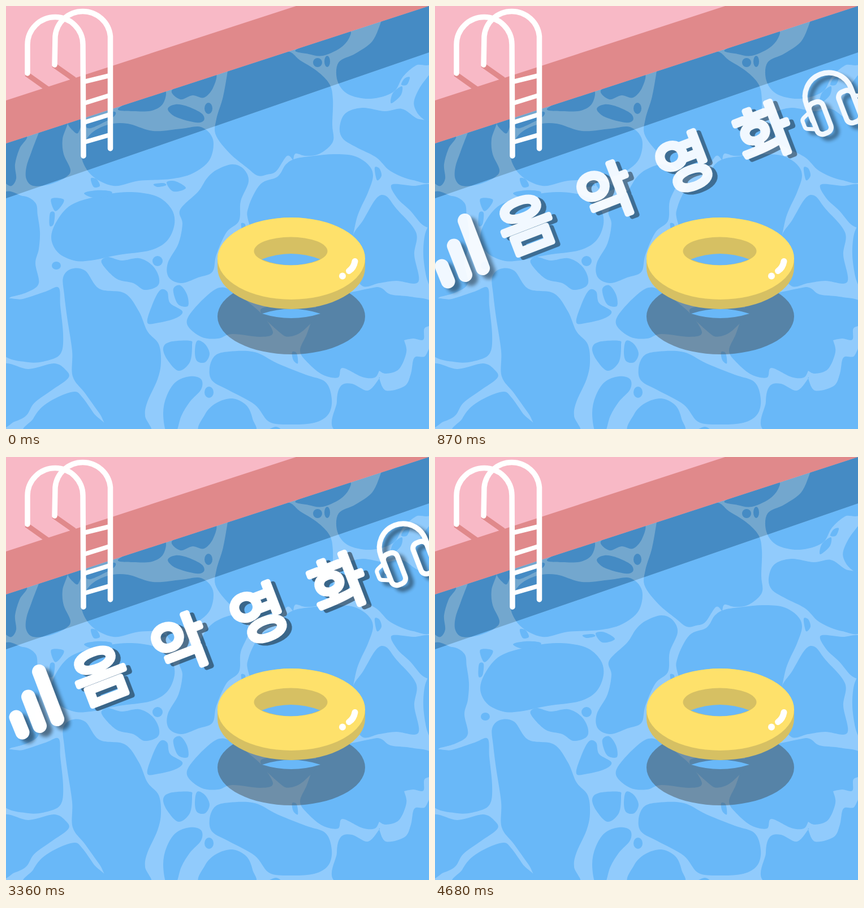
Write an HTML page that moves like this. It is 748 px wide and 748 px high and loops after 4.71 s.

```html
<!DOCTYPE html>
<html lang="ko">
<head>
<meta charset="utf-8">
<title>Pool</title>
<style>
  html, body { margin: 0; width: 100%; height: 100%; overflow: hidden; }
  svg { display: block; width: 100vw; height: 100vh; }
  .line { fill: none; stroke: #fff; stroke-linecap: round; stroke-linejoin: round; }
  .crisp { filter: drop-shadow(9px 4px 0 rgba(0, 0, 0, .45)); }
  .soft { filter: drop-shadow(10px 7px 3px rgba(0, 0, 0, .45)); }
  text {
    font: 400 106px "Noto Sans CJK KR", "Noto Sans CJK JP", "Noto Sans CJK", sans-serif;
    text-anchor: middle; fill: #fff; stroke: #fff; stroke-width: 9; stroke-linejoin: round;
  }
</style>
</head>
<body>
<svg viewBox="0 0 748 748">
  <defs>
    <clipPath id="wall"><path d="M0 243L748 0V82L0 340z"/></clipPath>
    <g id="cells">
      <!-- along the wall -->
      <polygon points="-10 235 36 230 24 252 16 280 18 305 10 318 0 314 -10 300"/>
      <polygon points="58 224 58 224 108 200 100 235 102 262 114 290 104 304 75 316 48 318 36 306 36 285 45 258"/>
      <polygon points="110 206 134 197 128 224 118 220"/>
      <polygon points="144 207 188 187 190 196 150 216"/>
      <polygon points="133 262 148 228 180 210 215 208 260 221 310 217 345 214 366 236 360 272 330 296 290 306 235 309 190 318 150 298"/>
      <polygon points="198 182 240 160 280 148 278 172 258 185 225 186"/>
      <polygon points="294 148 340 130 371 120 366 145 350 162 330 158 308 165"/>
      <polygon points="286 182 300 174 322 178 346 190 350 202 336 206 300 196"/>
      <polygon points="392 115 392 115 440 96 495 80 520 96 550 115 572 138 578 165 577 210 578 240 555 261 530 265 512 261 508 273 508 273 497 265 478 292 462 298 445 300 425 285 395 260 371 228 372 200 384 160"/>
      <polygon points="512 78 560 60 606 44 606 58 590 75 560 88 535 85"/>
      <polygon points="664 26 664 26 755 -4 755 95 725 105 702 125 685 152 645 164 605 156 586 132 588 100 618 84 648 62"/>
      <ellipse cx="358" cy="181" rx="7" ry="10"/>
      <ellipse cx="551" cy="100" rx="8" ry="8"/>
      <ellipse cx="568" cy="98" rx="5" ry="10"/>
      <!-- right side -->
      <polygon points="681 172 684 154 700 142 698 158"/>
      <polygon points="699 139 705 128 714 126 709 139"/>
      <polygon points="722 166 738 135 760 120 760 210 738 200 725 185"/>
      <polygon points="590 215 600 190 630 180 670 186 700 182 725 198 755 215 755 305 720 308 680 292 655 268 620 250 596 235"/>
      <polygon points="652 286 660 287 664 300 656 308"/>
      <polygon points="429 355 450 315 480 302 495 280 512 270 545 265 580 262 615 265 640 280 649 300 640 330 622 370 600 440 540 470 460 465 430 385"/>
      <polygon points="655 340 672 336 690 358 725 400 722 440 729 488 690 486 660 490 630 495 612 460 612 410 632 378"/>
      <polygon points="682 316 720 318 755 320 755 385 738 388 715 362 692 340"/>
      <polygon points="742 400 755 390 755 490 745 485 738 440"/>
      <polygon points="560 520 640 500 662 498 680 510 715 514 755 524 755 560 740 570 738 590 720 588 704 591 704 591 708 612 695 642 672 650 660 645 660 645 652 657 630 656 595 640 587 657 560 652 535 632 520 610 532 580 545 545"/>
      <polygon points="590 755 585 700 592 672 612 668 640 680 660 659 660 659 672 680 705 672 716 650 722 622 740 620 755 608 755 755"/>
      <!-- middle -->
      <polygon points="372 290 400 280 420 288 429 310 415 345 412 380 390 400 372 440 365 470 340 480 310 490 288 480 286 455 305 420 312 385 308 360 340 328 355 305"/>
      <polygon points="416 384 423 386 422 398 417 394"/>
      <polygon points="80 410 90 380 115 352 160 337 215 329 265 336 292 358 298 385 285 415 255 432 200 440 150 450 120 450 92 436"/>
      <polygon points="80 341 102 342 96 356 86 362"/>
      <polygon points="78 366 86 366 84 386 77 388"/>
      <polygon points="150 305 160 306 166 318 155 320"/>
      <polygon points="138 331 160 326 186 328 182 336 155 339"/>
      <polygon points="261 315 278 313 283 317 268 320"/>
      <polygon points="284 312 300 310 318 322 296 328"/>
      <polygon points="169 454 180 444 205 450 235 446 258 458 270 478 268 495 245 502 225 490 195 482"/>
      <polygon points="250 560 258 530 272 503 285 505 290 525 312 540 300 552 270 560"/>
      <polygon points="296 500 308 494 320 510 322 530 308 530 300 520"/>
      <polygon points="320 562 333 535 372 500 400 503 430 525 455 548 472 578 450 585 400 580 375 588 345 585"/>
      <polygon points="452 535 552 535 530 570 505 584 485 578"/>
      <ellipse cx="89" cy="459" rx="8" ry="7"/>
      <ellipse cx="268" cy="451" rx="9" ry="9"/>
      <!-- left and bottom -->
      <polygon points="-10 343 30 336 52 348 56 370 60 400 58 430 52 455 58 490 40 505 10 514 -10 514"/>
      <polygon points="-10 525 30 518 70 505 93 498 96 530 101 580 98 612 80 625 40 630 -10 610"/>
      <polygon points="101 480 115 465 140 468 165 500 210 508 235 540 250 575 270 598 274 630 268 660 250 700 246 725 255 755 190 755 165 720 140 685 118 655 117 610 108 550 103 510"/>
      <polygon points="-10 638 40 642 85 632 106 644 110 658 80 680 50 702 36 724 15 735 -10 740"/>
      <polygon points="38 755 48 730 65 708 95 690 122 682 135 692 155 720 178 755"/>
      <polygon points="278 605 290 594 325 592 329 600 325 630 305 645 285 625"/>
      <polygon points="338 592 352 598 360 615 352 630 338 628 334 612"/>
      <polygon points="278 720 284 690 300 665 325 655 345 660 345 678 325 700 310 725 300 755 284 755"/>
      <polygon points="345 755 352 722 372 702 400 694 425 706 436 730 436 755"/>
      <polygon points="360 640 370 618 395 611 440 612 480 632 530 652 565 665 576 695 570 722 545 737 500 740 465 735 440 705 395 680 365 663"/>
      <polygon points="506 612 514 614 516 632 508 626"/>
      <polygon points="465 750 478 744 488 752"/>
      <ellipse cx="359" cy="683" rx="8" ry="10"/>
    </g>
  </defs>

  <rect width="748" height="748" fill="#91cbfc"/>
  <use href="#cells" fill="#69b8f8"/>
  <g clip-path="url(#wall)">
    <rect width="748" height="748" fill="#73a7ce"/>
    <use href="#cells" fill="#458bc4"/>
  </g>
  <path d="M0 0H748L0 243z" fill="#e0898b"/>
  <path d="M0 0H513L0 167z" fill="#f8b9c6"/>

  <path d="M36 120L74 147M84 104L121 130" stroke="#e0898b" stroke-width="9"/>
  <g class="line" stroke-width="9.5">
    <path d="M86 104L87 53.500A49 49 0 0 1 184.500 53.500V252"/>
    <path d="M38 119V68.500A49 49 0 0 1 136 68.500L137 265"/>
    <path d="M138 134L183 123M138 172L183 158M138 206L183 192M138 241L183 228" stroke-width="8" stroke-linecap="butt"/>
  </g>

  <g id="title" opacity="0">
    <g class="soft">
      <path class="line" stroke-width="25" d="M18 460L29 487M39.500 424L59.500 475.500M58.500 379.500L90.500 463.500"/>
    </g>
    <g class="crisp">
      <text transform="translate(167 385) rotate(-21)" x="0 151 300 450" y="40">음악영화</text>
    </g>
    <g class="soft">
      <g class="line" transform="translate(713 188) rotate(-21)" stroke-width="9">
        <path d="M-42 0V-30A42 42 0 0 1 42 -30V0"/>
        <rect x="-41" y="-29" width="26" height="58" rx="10"/>
        <rect x="15" y="-29" width="26" height="58" rx="10"/>
        <path stroke-width="7" d="M-42-16l-12 5q-5 2-5 6v10q0 4 5 6l12 5M42-16l12 5q5 2 5 6v10q0 4-5 6l-12 5"/>
      </g>
    </g>
  </g>

  <path fill="#3a362e" fill-opacity=".4" fill-rule="evenodd"
    d="M374 549a130.500 67 0 0 1 261 0a130.500 67 0 0 1-261 0zM453 544Q504 527 556 544Q504 560 453 544z"/>
  <path fill="#d6c063" fill-rule="evenodd"
    d="M374 447a130.500 73 0 0 1 261 0v16a130.500 73 0 0 1-261 0zM452 448Q504 428 556 448Q504 469 452 448z"/>
  <path fill="#fee16b" fill-rule="evenodd"
    d="M374 446.500a130.500 72.500 0 0 1 261 0a130.500 72.500 0 0 1-261 0zM438.500 433.500a65 25 0 0 0 130 0a65 25 0 0 0-130 0z"/>
  <circle cx="595" cy="477.500" r="6" fill="#fff"/>
  <path class="line" stroke-width="11" d="M606.500 468.500Q615 463 617 451.500"/>
</svg>
<script>
  const LOOP = 4710;

  // Closed Catmull-Rom curve; a doubled point makes a corner.
  function smooth(points) {
    const n = points.length;
    const at = i => points[(i + n) % n];
    const handle = (p, a, b) => `${p.x + (b.x - a.x) / 6} ${p.y + (b.y - a.y) / 6}`;
    let d = `M${at(0).x} ${at(0).y}`;
    for (let i = 0; i < n; i++) {
      const p = at(i), q = at(i + 1);
      d += `C${handle(p, at(i - 1), q)} ${handle(q, at(i + 2), p)} ${q.x} ${q.y}`;
    }
    return d + 'z';
  }

  for (const cell of document.querySelectorAll('#cells polygon')) {
    const path = document.createElementNS('http://www.w3.org/2000/svg', 'path');
    path.setAttribute('d', smooth([...cell.points]));
    cell.replaceWith(path);
  }

  // time, x shift, opacity, easing towards the next step
  const steps = [
    [0, -65, 0, 'linear'],
    [647, -65, 0, 'cubic-bezier(.33, 1, .68, 1)'],
    [1052, 0, 1, 'linear'],
    [3350, 0, 1, 'cubic-bezier(.33, 0, .67, .33)'],
    [3910, 80, 0, 'linear'],
    [LOOP, 80, 0, 'linear'],
  ];
  document.getElementById('title').animate(
    steps.map(([time, x, opacity, easing]) => ({
      offset: time / LOOP, transform: `translateX(${x}px)`, opacity, easing,
    })),
    { duration: LOOP, iterations: Infinity }
  );
</script>
</body>
</html>
```
